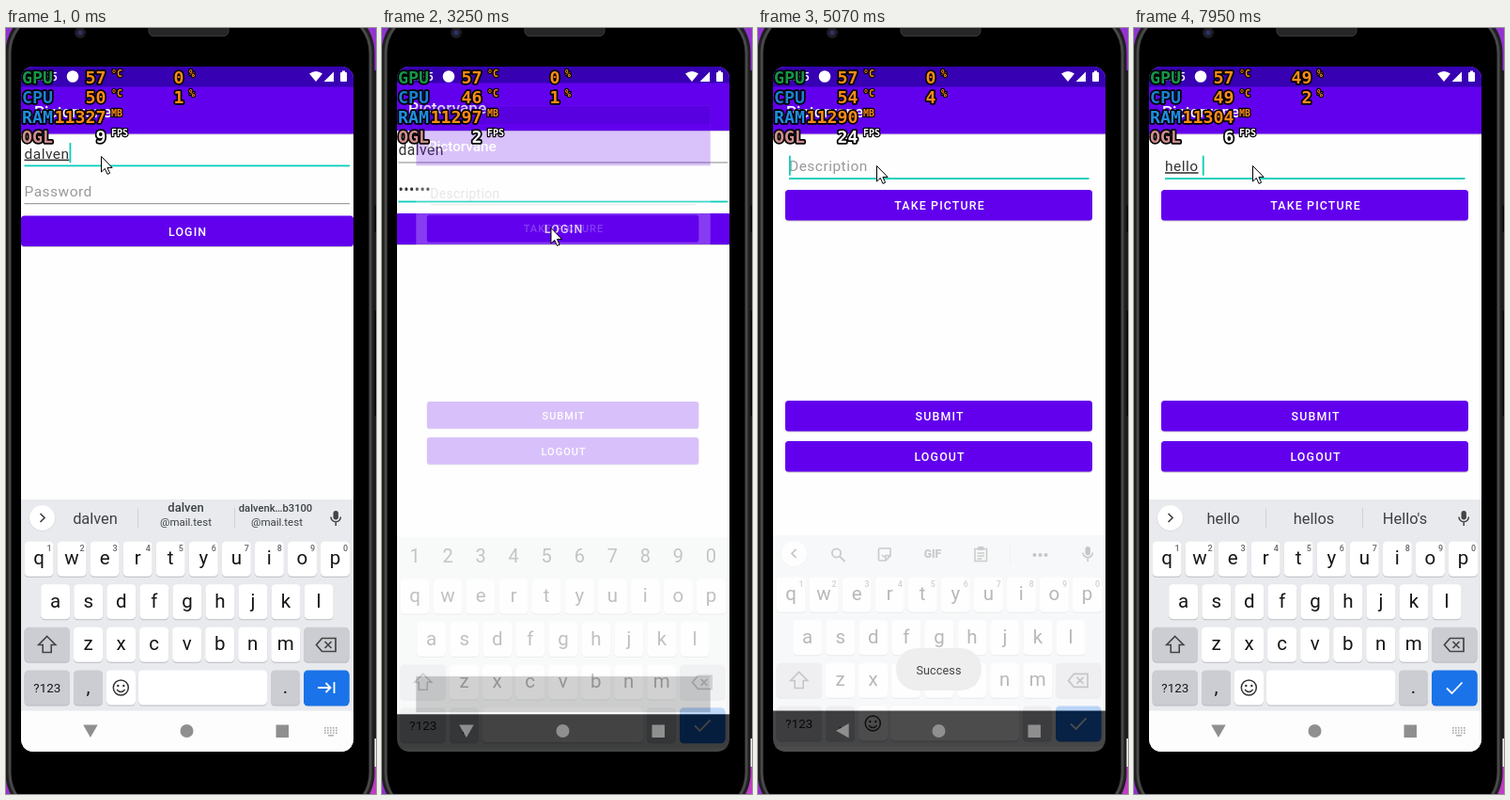
Recreate the animation shown at these times as an HTML page. Size 394 by 814 pixels, loop 8 s.

```html
<!DOCTYPE html>
<html lang="en">
<head>
<meta charset="utf-8">
<style>
  html, body { margin: 0; width: 100%; height: 100%; overflow: hidden; background: #000; }
  svg { display: block; width: 394px; height: 814px; font-family: Roboto, sans-serif; }
  text { white-space: pre; }
</style>
</head>
<body>
<svg id="stage" viewBox="0 0 394 814"></svg>
<script>
const LOOP = 8000;
const USER = 'dalven', APP = 'Pictorvane';
const PURPLE = '#6200ee', DARK = '#3700b3', TEAL = '#0bcdba', INK = '#3c4043';

const TICKS = [0, 290, 420, 550, 680, 1180, 1310, 1450, 1590, 1720, 2160,
  2460, 2600, 2740, 2880, 3010, 3130, 3250, 3370,
  3520, 3670, 3800, 3940, 4080, 4210, 4360, 4510,
  4630, 4770, 4910, 5050, 5190, 5320, 5440, 5560, 5680, 6080,
  6640, 6790, 6940, 7220, 7350, 7490, 7800, 7950];

// time, GPU %, CPU °C, CPU %, RAM, FPS
const STATS = [
  [0, 0, 50, 1, 11327, 9], [680, 0, 49, 2, 11327, 9], [1590, 0, 48, 3, 11297, 10],
  [2160, 0, 48, 3, 11297, 2], [2600, 0, 46, 1, 11297, 2], [3370, 0, 54, 4, 11290, 24],
  [5190, 9, 52, 5, 11315, 47], [6080, 9, 52, 5, 11315, 15], [6790, 31, 50, 3, 11308, 4],
  [7490, 49, 49, 2, 11304, 6]];

const MOUSE = [[200, 101, 136], [550, 159.5, 169], [2400, 159.5, 169], [2740, 179.5, 212],
  [3480, 179.5, 212], [4200, 235, 314], [4400, 235, 314], [4950, 126, 146]];

const TYPED = [[0, ''], [6640, 'h'], [7220, 'he'], [7350, 'hel'], [7490, 'hell'], [7800, 'hello'], [7950, 'hello ']];
const WORDS = {
  h: ['h', 'have', 'how'], he: ['he', 'here', 'her'], hel: ['hel', 'help', 'held'],
  hell: ['hell', 'hello', "he'll"], hello: ['hello', 'hellos', "Hello's"]
};

const pen = document.createElement('canvas').getContext('2d');
const clamp = x => Math.max(0, Math.min(1, x));
const ramp = (t, from, len) => clamp((t - from) / len);
const latest = (rows, t) => rows.filter(r => r[0] <= t).pop();

const rect = (x, y, w, h, fill, r = 0, extra = '') =>
  `<rect x="${x}" y="${y}" width="${w}" height="${h}" rx="${r}" fill="${fill}" ${extra}/>`;
const circle = (x, y, r, fill, extra = '') => `<circle cx="${x}" cy="${y}" r="${r}" fill="${fill}" ${extra}/>`;
const fillPath = (d, fill, extra = '') => `<path d="${d}" fill="${fill}" ${extra}/>`;
const line = (d, color, w = 1.7) => fillPath(d, 'none', `stroke="${color}" stroke-width="${w}"`);
const text = (x, y, s, size, fill, extra = '') => `<text x="${x}" y="${y}" font-size="${size}" fill="${fill}" ${extra}>${s}</text>`;
const mid = (x, y, s, size, fill, extra = '') => text(x, y, s, size, fill, 'text-anchor="middle" ' + extra);
const group = (body, transform = '', extra = '') => `<g transform="${transform}" ${extra}>${body}</g>`;
const zoom = (s, body, alpha = 1) => group(body, `translate(193 405) scale(${s}) translate(-193 -405)`, `opacity="${alpha}"`);

function mouseAt(t) {
  const i = MOUSE.findIndex(k => k[0] > t);
  if (i === 0) return MOUSE[0].slice(1);
  if (i < 0) return MOUSE[MOUSE.length - 1].slice(1);
  const [a, b] = [MOUSE[i - 1], MOUSE[i]], p = (t - a[0]) / (b[0] - a[0]);
  return [1, 2].map(k => a[k] + (b[k] - a[k]) * p);
}

function field({ x, right, base, value = '', hint = '', focus, caret, composing }) {
  const spaced = 'letter-spacing=".48"', word = value.trimEnd();
  pen.font = '15.5px Roboto, sans-serif';
  const end = x + pen.measureText(value).width + .48 * value.length;
  return (value
    ? text(x, base, word, 15.5, '#333', spaced + (composing ? ' text-decoration="underline"' : ''))
    : text(x, base, hint, 15.5, '#999', spaced)) +
    rect(x, base + 6.9, right - x, focus ? 1.8 : 1, focus ? TEAL : '#8a8a8a') +
    (caret ? rect(end, base - 16.5, 1.8, 21, TEAL) : '');
}

const button = (x, y, w, label) =>
  rect(x, y + .8, w, 32.6, '#0003', 3.5) + rect(x, y, w, 32.5, PURPLE, 3.5) +
  mid(193.6, y + 21, label, 12.4, '#fff', 'font-weight="500" letter-spacing="1.15"');

const page = body => rect(16, 725.5, 354, 43.5, '#000') + rect(16, 41, 354, 684.5, '#fefefe') +
  rect(16, 112, 354, 1.5, '#0002') + rect(16, 41, 354, 71.5, PURPLE) + rect(16, 41, 354, 21.5, DARK) +
  text(30, 95, APP, 17.2, '#fff', 'font-weight="500"') + body;

function loginPage(t) {
  const onPass = t >= 550;
  const n = [1180, 1310, 1450, 1590, 1720].filter(k => k <= t).length;
  const count = n ? n + 1 : 0;
  const pass = !count ? '' : t >= 3250 ? '•'.repeat(6) : '•'.repeat(count - 1) + USER[count - 1];
  const caret = t < 2160 || (t >= 2600 && t < 3130);
  const r = 105 + (t - 2880) * .7, left = Math.max(16, 180 - r);
  return page(
    field({ x: 19.5, right: 366, base: 138.6, value: USER, focus: !onPass, caret: !onPass, composing: !onPass }) +
    field({ x: 19.5, right: 366, base: 179.3, value: pass, hint: 'Password', focus: onPass, caret: onPass && caret }) +
    button(16, 199.5, 354, 'LOGIN') +
    (t >= 2740 && t < 3250 ? rect(left, 199.5, Math.min(370, 180 + r) - left, 32.5, '#fff', 3, 'opacity=".04"') : ''));
}

function postPage(t) {
  const focus = t >= 5050;
  return page(
    field({ x: 33, right: 352.5, base: 152.2, value: latest(TYPED, t)[1], hint: 'Description',
      focus, caret: focus && (t < 6080 || t >= 6640), composing: true }) +
    button(29, 172, 327, 'TAKE PICTURE') + button(29, 396, 327, 'SUBMIT') + button(29, 439, 327, 'LOGOUT'));
}

function key(x, y, w, label = '', { fill = '#fff', edge = '#b9bcc1', size = 20.5, sup = '' } = {}) {
  return rect(x, y + 1, w, 37, edge, 4.5) + rect(x, y, w, 37, fill, 4.5) +
    mid(x + w / 2, y + (size < 20 ? 23.5 : 24.5), label, size, '#151515') +
    (sup && text(x + 24, y + 10, sup, 9, '#666', 'font-weight="500"'));
}

const divider = x => rect(x, 510, 1, 21, '#cfd1d5');
const chevron = d => circle(38.5, 521, 14, '#0001') + circle(38.5, 520.5, 13.5, '#fff') +
  line(`M${38.5 - 2 * d} 516l${4.5 * d} 4.5l${-4.5 * d} 4.5`, '#444');
const mic = rect(348.5, 513, 5.4, 9.5, '#444', 2.7) + line('M346 519.5a5.2 5.2 0 0 0 10.4 0M351.2 525v4', '#444', 1.5);

function toolbar() {
  return chevron(-1) + divider(268) + mic +
    circle(83.5, 520, 4.6, 'none', 'stroke="#555" stroke-width="1.8"') + line('M87 523.5l5.5 5.5', '#555', 2) +
    line('M130 515h11v8l-5 5h-6q-1.5 0-1.5-1.5v-10q0-1.5 1.5-1.5zM141.5 522.5h-5.5v5.5M132 522q2 3 4 2.5', '#555', 1.6) +
    mid(186, 525.3, 'GIF', 12, '#555', 'font-weight="900"') +
    line('M231 515.5h12.5v13h-12.5zM233.5 520h7.5M233.5 523h7.5M233.5 526h5', '#555', 1.5) + rect(234, 513, 6.5, 4, '#555', 1) +
    [294.5, 300.5, 306.5].map(x => circle(x, 522, 2, '#444')).join('');
}

function suggestions(words) {
  return chevron(1) + divider(140) + divider(243) + mic +
    words.map((w, i) => Array.isArray(w)
      ? mid([95, 191.5, 287][i], 514, w[0], i === 1 ? 13 : 11.2, INK, 'font-weight="500"') +
        mid([95, 191.5, 288.5][i], 529, w[1], 11.5, INK)
      : mid([95, 191.5, 288.5][i], 527, w, 16.4, INK)).join('');
}

function keyboard(t) {
  const secret = t >= 680 && t < 4000, soft = { fill: '#cbcdd2' };
  const mail = '@mail.test', typed = latest(TYPED, t)[1].trim();
  const top = secret
    ? [...'1234567890'].map((d, i) => mid(35 + 35.05 * i, 528.5, d, 20, '#222')).join('')
    : t < 4000 ? suggestions([USER, [USER, mail], ['dalvenk…b3100', mail]])
    : t < 6790 ? toolbar() : suggestions(WORDS[typed]);
  const row = (letters, x, y, sups = '') =>
    [...letters].map((c, i) => key(x + 35.05 * i, y, 31, c, { sup: sups[i] || '' })).join('');
  const enter = t < 680
    ? 'M332 701h13M340.5 696l5 5l-5 5M349.5 695v12'
    : 'M333 701.5l5.5 5.5l11-11.5';
  return rect(16, 501, 354, 330, '#e8eaed') + rect(16, 725.5, 354, 100, '#fdfdfd') + top +
    row('qwertyuiop', 19.5, 545.8, secret ? '' : '1234567890') +
    row('asdfghjkl', 37.2, 591.3) + row('zxcvbnm', 72, 636.8) +
    key(19.5, 636.8, 48.5, '', soft) + line('M43.7 646.5l9 9h-4.5v8h-9v-8h-4.5z', '#444', 1.6) +
    key(317, 636.8, 48.5, '', soft) +
    line('M336.5 648.5h14.5v14h-14.5l-6-7zM339.5 652l7 7M346.5 652l-7 7', '#444', 1.7) +
    key(19.5, 682.5, 48.5, '?123', { ...soft, size: 13.4 }) + key(72, 682.5, 31, ',', soft) +
    (secret ? key(107, 682.5, 171, '') : key(107, 682.5, 31) + key(141, 682.5, 137) +
      circle(122.3, 701, 8, 'none', 'stroke="#333" stroke-width="1.5"') +
      circle(119.3, 699, 1.2, '#333') + circle(125.3, 699, 1.2, '#333') + line('M118 703q4.3 5 8.6 0', '#333', 1.5)) +
    key(282, 682.5, 31, '.', soft) + key(317, 682.5, 48.5, '', { fill: '#1a73e8', edge: '#1a6fe0' }) + line(enter, '#fff', 1.8);
}

function navIcons(turn, open) {
  let s = fillPath('M-8 -6.5h15.5l-7.8 13.5z', '#8f8f8f', `transform="translate(90.2 747) rotate(${turn})"`) +
    circle(192.5, 747, 7, '#8f8f8f') + rect(287.5, 740.5, 13.5, 13.5, '#8f8f8f');
  if (open) {
    for (let r = 0; r < 3; r++) for (let c = 0; c < 5; c++) s += rect(339 + 3 * c, 743 + 2.7 * r, 1.6, 1.5, '#a5a5a5');
    s += rect(343, 751.2, 6, 1.3, '#a5a5a5');
  }
  return s;
}

const statusIcons = text(30, 56, '5:35', 12.5, '#fff', 'font-weight="500"') + circle(71, 51.5, 6.3, '#fff') +
  fillPath('M323 48.5q7-5 14 0l-7 8.5z', '#fff') + fillPath('M338.5 57l10.5-10.5v10.5z', '#fff') +
  rect(356, 47, 7, 10, '#fff', 1) + rect(358, 45.5, 3, 2, '#fff');

const phone = rect(0, 0, 394, 814, '#9333cf') + rect(386, 755, 8, 30, '#f4f4f4') + rect(386, 785, 8, 29, '#c03cc4') +
  rect(390, 45, 4, 710, '#1c1c1c') + rect(391, 188, 3, 29, '#050505', 1) + rect(391, 300, 3, 112, '#050505', 1) +
  rect(-.5, -22, 393, 862, '#1f1f1f', 48) +
  rect(4, -18, 384, 854, '#000', 45, 'stroke="#484848" stroke-width="3"') +
  rect(152, -7, 85, 15.5, '#262626', 5, 'stroke="#3b3b3b"') +
  circle(79, 5, 6, '#1b1b20') + circle(79, 5, 2.8, '#2d3164');

function overlay(t) {
  const [, gpu, temp, cpu, ram, fps] = latest(STATS, t), orange = '#ff8b17';
  const big = (x, y, s, fill, anchor = 'end') => text(x, y, s, 18.3, fill, `text-anchor="${anchor}" stroke-width="3.4"`);
  const unit = (x, y, s, fill = orange) => text(x, y - 7, s, 10, fill, 'stroke-width="2.4"');
  const rows = [['GPU', '#159447', 57, '°C', gpu], ['CPU', '#1c7fd0', temp, '°C', cpu],
    ['RAM', '#1f8ee0', ram, 'MB'], ['OGL', '#cf8d8d', fps, 'FPS']];
  return group(rows.map(([name, color, value, u, load], i) => {
    const y = 58.7 + 21 * i, tint = i === 3 ? '#fff' : orange;
    return big(17, y, name, color, 'start') + big(106.5, y, value, tint) + unit(112, y, u, tint) +
      (load === undefined ? '' : big(189.5, y, load, orange) + unit(195, y, '%'));
  }).join(''), '', `font-family="DejaVu Sans Mono, monospace" font-weight="700" stroke="#000" paint-order="stroke" stroke-linejoin="round"`);
}

function draw(t) {
  const opened = 1 - (1 - ramp(t, 3200, 400)) ** 2;
  const shown = t < 4000 ? 1 - ramp(t, 3110, 190) : 1 - (1 - ramp(t, 5000, 450)) ** 3;
  const turn = 90 * (t < 4000 ? ramp(t, 3300, 300) : 1 - ramp(t, 5100, 265));
  const toast = t < 5000 ? ramp(t, 3300, 140) : 1 - ramp(t, 5260, 340);
  const screen = rect(16, 41, 354, 728, '#000') +
    (opened < 1 ? zoom(1 + .05 * opened, loginPage(t)) : '') +
    (opened > 0 ? zoom(.85 + .15 * opened, postPage(t), opened) : '') +
    (shown > 0 ? group(keyboard(t), `translate(0 ${54 * (1 - shown)})`, `opacity="${shown}"`) : '') +
    navIcons(turn, shown > .5) + statusIcons +
    rect(147, 659, 91, 45, '#eee', 22, `opacity="${toast ** 2}"`) +
    mid(192.5, 687, 'Success', 12.6, '#444', `letter-spacing=".1" opacity="${toast}"`);
  const pointer = fillPath('M.5 .5v16.5l3.8-3.6l2.7 6l2.6-1.2l-2.7-5.8h5.2z', '#fff', 'stroke="#000"');
  return '<clipPath id="glass">' + rect(16, 41, 354, 728, '#000', 13) + '</clipPath>' + phone +
    group(screen, '', 'clip-path="url(#glass)"') + overlay(t) + group(pointer, `translate(${mouseAt(t)})`);
}

const stage = document.getElementById('stage');
let last = -1;
function frame() {
  const now = performance.now() % LOOP;
  const t = TICKS.filter(k => k <= now).pop();
  if (t !== last) stage.innerHTML = draw(last = t);
  requestAnimationFrame(frame);
}
frame();
</script>
</body>
</html>
```
